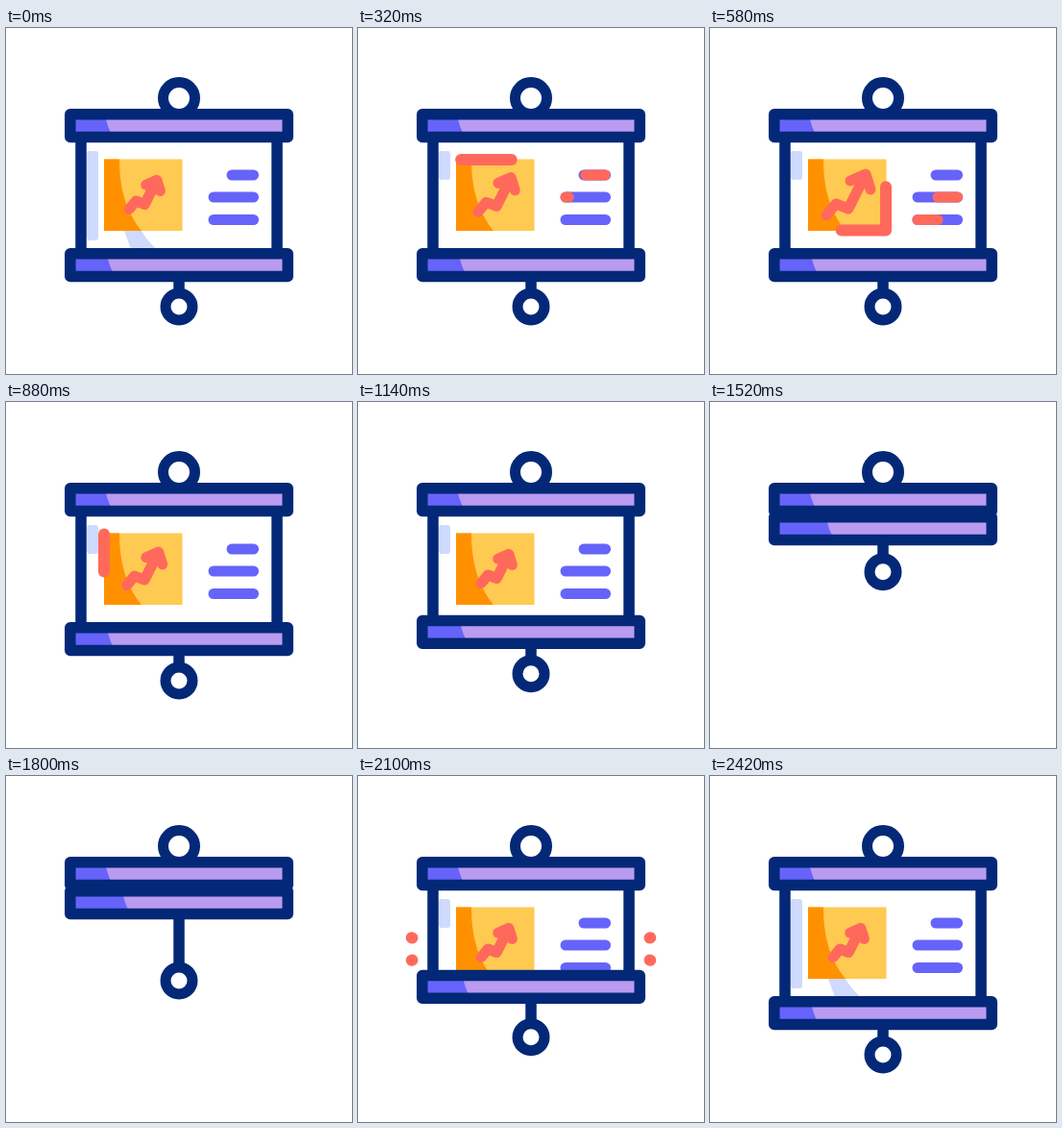
Write an HTML page with a canvas that moves like this. It is 360 by 360 pixels and loops after 3400 ms.

```html
<!DOCTYPE html>
<html lang="en">
<head>
<meta charset="utf-8">
<title>Presentation board</title>
<style>
  html, body { margin: 0; width: 100%; height: 100%; overflow: hidden; background: #fff; }
  canvas { display: block; width: 360px; height: 360px; }
</style>
</head>
<body>
<canvas id="stage" width="360" height="360"></canvas>
<script>
const ctx = document.getElementById('stage').getContext('2d');
const LOOP = 3400;
const NAVY = '#032877', INDIGO = '#6663fa', LILAC = '#b99bf0', RED = '#ff695c',
      ORANGE = '#ff9100', YELLOW = '#ffca51', PALE = '#d0daff';

// Eased progress from 0 to 1 between two times
function ease(t, from, to) {
  const x = Math.min(1, Math.max(0, (t - from) / (to - from)));
  return x * x * (3 - 2 * x);
}

function line(points, color, width = 11) {
  ctx.beginPath();
  points.forEach(([x, y]) => ctx.lineTo(x, y));
  ctx.strokeStyle = color;
  ctx.lineWidth = width;
  ctx.stroke();
}

// Draws the part of a polyline between two fractions of its length
function trim(points, tail, head, color, width = 11) {
  if (head <= tail) return;
  const lengths = points.slice(1).map(([x, y], i) =>
    Math.hypot(x - points[i][0], y - points[i][1]));
  const total = lengths.reduce((a, b) => a + b);
  const part = [];
  let done = 0;
  lengths.forEach((len, i) => {
    const a = Math.max(0, (tail * total - done) / len);
    const b = Math.min(1, (head * total - done) / len);
    const [x0, y0] = points[i], [x1, y1] = points[i + 1];
    if (a < b) for (const k of [a, b]) part.push([x0 + (x1 - x0) * k, y0 + (y1 - y0) * k]);
    done += len;
  });
  line(part, color, width);
}

function rect(x, y, w, h, color) {
  ctx.fillStyle = color;
  ctx.fillRect(x, y, w, h);
}

function ring(y, r) {
  ctx.beginPath();
  ctx.arc(180, y, r, 0, Math.PI * 2);
  ctx.fillStyle = '#fff';
  ctx.fill();
  ctx.strokeStyle = NAVY;
  ctx.lineWidth = 11;
  ctx.stroke();
}

function bar(y, shadeX) {
  rect(67, y + 6, 226, 23, LILAC);
  ctx.beginPath();
  ctx.moveTo(67, y + 6);
  ctx.lineTo(shadeX - 2, y + 6);
  ctx.quadraticCurveTo(shadeX, y + 18, shadeX + 6, y + 29);
  ctx.lineTo(67, y + 29);
  ctx.fillStyle = INDIGO;
  ctx.fill();
  ctx.strokeStyle = NAVY;
  ctx.lineWidth = 11.5;
  ctx.strokeRect(66.8, y + 5.7, 226.4, 23.7);
}

function shadows(resting) {
  ctx.fillStyle = PALE;
  ctx.beginPath();
  ctx.roundRect(84, 128, 12, resting ? 93 : 30, 3);
  ctx.fill();
  if (!resting) return;
  ctx.beginPath();
  ctx.moveTo(123, 211);
  ctx.lineTo(141, 211);
  ctx.quadraticCurveTo(147, 222, 157, 230);
  ctx.lineTo(130, 230);
  ctx.fill();
}

function chart(t) {
  rect(102, 136.5, 81.5, 74.5, YELLOW);
  ctx.beginPath();
  ctx.moveTo(102, 136.5);
  ctx.lineTo(118, 136.5);
  ctx.bezierCurveTo(118, 165, 124, 190, 141, 211);
  ctx.lineTo(102, 211);
  ctx.fillStyle = ORANGE;
  ctx.fill();

  const s = 0.7 + 0.3 * (ease(t, 100, 580) - ease(t, 580, 1080));
  const grow = points => points.map(([x, y]) => [145 + (x - 145) * s, 173 + (y - 173) * s]);
  line(grow([[121, 195], [131, 183], [144, 188], [160, 156]]), RED);
  line(grow([[146, 159], [162, 152], [167, 168]]), RED);

  trim([[102, 137], [183, 137], [183, 210.5], [102, 210.5], [102, 137]],
    ease(t, 260, 1060), ease(t, 100, 900), RED, 12);
}

function textRows(t) {
  [[235, 153], [216, 176], [216, 199.5]].forEach(([x, y], i) => {
    const row = [[x, y], [257.5, y]], start = 100 + i * 180;
    line(row, INDIGO);
    trim(row, ease(t, start + 180, start + 420), ease(t, start, start + 240), RED);
  });
}

function sparks(t) {
  const tail = ease(t, 2180, 2400), head = ease(t, 2080, 2240);
  for (const side of [-1, 1])
    for (const dir of [-1, 1])
      trim([[180 + side * 123.5, 180 + dir * 11.5], [180 + side * 139.5, 180 + dir * 16]],
        tail, head, RED, 12);
}

function draw(t) {
  const opening = ease(t, 1800, 2240);
  const fold = ease(t, 1080, 1480) - opening;
  const pull = 38 * (ease(t, 1480, 1800) - opening);
  const barY = 229 - 115 * fold;
  const knobY = 290 - 115 * fold + pull;

  ctx.clearRect(0, 0, 360, 360);
  ctx.lineCap = ctx.lineJoin = 'round';

  ctx.save();
  ctx.beginPath();
  ctx.rect(72, 100, 216, barY - 90);
  ctx.clip();
  shadows(t < 100 || t >= 2420);
  chart(t);
  textRows(t);
  ctx.restore();

  for (const x of [78, 282]) line([[x, 110], [x, barY + 8]], NAVY, 11.5);
  line([[180, barY + 29], [180, knobY - 14]], NAVY, 11.5);
  ring(knobY, 14);
  ring(73, 16.5);
  bar(barY, 107 + 16 * fold);
  bar(84, 105);
  sparks(t);
}

function frame(now) {
  draw(now % LOOP);
  requestAnimationFrame(frame);
}
requestAnimationFrame(frame);
</script>
</body>
</html>
```
